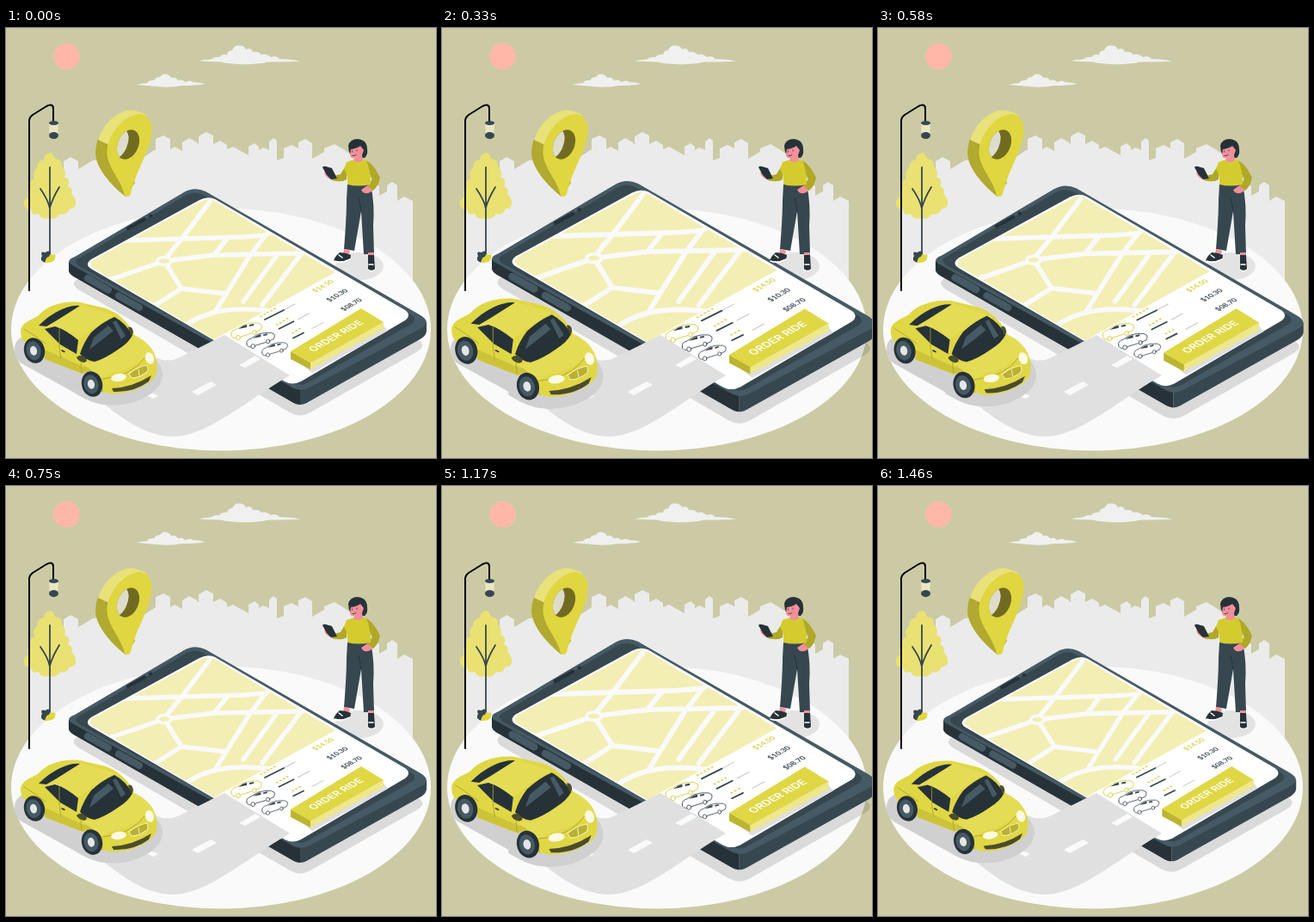
Recreate the animation shown at these times as an HTML page. Size 500 by 500 pixels, loop 1500 ms.

```html
<!DOCTYPE html>
<html lang="en">
<head>
<meta charset="utf-8">
<title>Order ride</title>
<style>
  html, body { margin: 0; width: 100%; height: 100%; overflow: hidden; background: #cccaa4; }
  svg { display: block; width: 100vw; height: 100vh; }
  text { font: 700 8px Lato, sans-serif; text-anchor: middle; }
  .line { fill: none; stroke-linecap: round; stroke-linejoin: round; }
</style>
</head>
<body>
<svg viewBox="0 0 500 500">
  <defs>
    <clipPath id="mapArea"><path d="M101 270 L226 202 Q235 197 242 201 L383 284 L242 362 L101 279 Q95 275 101 270Z"/></clipPath>
    <clipPath id="pinHole"><ellipse cx="142" cy="135.500" rx="12" ry="18" transform="rotate(23 142 135.500)"/></clipPath>
    <g id="van" class="line" stroke-width=".9">
      <path d="M-17 5 Q-18 0 -11 -2 L-3 -7 Q6 -10 14 -9 L18 -7 Q19 -4 17 -1 L12 1 M7 3 L-6 7 M-12 9 Q-17 9 -17 5"/>
      <path d="M-9 -2 L-3 -6 L1 -7 L1 -4Z M4 -5 L4 -7 L9 -8 L9 -6Z" fill="#37474f" stroke="none"/>
      <ellipse cx="-9" cy="8" rx="2.500" ry="2.700"/><ellipse cx="10" cy="2" rx="2.200" ry="2.500"/>
    </g>
  </defs>

  <!-- backdrop -->
  <circle cx="70.500" cy="33" r="15.300" fill="#ffb8a8"/>
  <g fill="#f0f0f0">
    <path d="M224 38.500 Q231 36.500 238 36.500 Q242 33 248 34 Q251 30 257 31 Q258 26 263 26 Q266 19 272 20.500 Q277 20 279 25 Q285 22 287 28 Q294 27 297 31 Q303 29 308 34 Q314 31 318 36 Q332 36 342 38.500 Q330 39.500 305 39.500 Q290 43 270 42 Q255 41 250 39.500Z"/>
    <path d="M152 66 Q158 64 164 64 Q167 60 172 61 Q174 57 179 57 Q182 52 187 54 Q191 55 192 58 Q197 56 200 61 Q206 59 208 63 Q214 60 218 63 Q226 63 231 65 Q222 67 205 67 Q190 70 176 68Z"/>
  </g>
  <path fill="#ebebeb" d="M27 310 V208 L40 200 67 205 V155 L75 150 84 155 V164 L101 154 160 150 174 141 V129 L183 125 191 129 V141 L196 138 205 143 V133 L213 128 222 133 224 136 V126 L233 121 241 125 V135 L249 131 257 136 V141 L264 138 282 148 V138 L289 134 294 138 V142 L299 139 306 142 V132 L311 128 315 131 V154 L323 151 V140 L332 136 340 140 V133 L348 129 356 134 V152 L370 144 V140 L382 135 392 141 406 150 428 180 434 184 V195 L443 190 V183 L449 179 455 183 V201 L463 196 473 201 V300Z"/>
  <ellipse cx="250" cy="350.500" rx="244" ry="141" fill="#fafafa"/>
  <ellipse cx="411" cy="277" rx="28" ry="16" fill="#e3e3e3"/>

  <!-- tree -->
  <path fill="#e9e172" d="M51 145 Q56 146 57 152 Q66 153 65 161 Q71 167 68 173 Q76 176 72 184 Q79 187 76 193 Q82 198 81 206 Q79 211 74 210 Q70 219 63 216 Q58 224 50 221 Q42 224 38 216 Q30 219 29 211 Q21 211 21 205 Q20 199 26 196 Q23 190 29 185 Q26 178 33 175 Q30 167 36 163 Q36 154 44 153 Q45 146 51 145Z"/>
  <path class="line" stroke="#37474f" stroke-width="1.800" d="M51 162 V270 M51 210 Q49 200 40 187 M51 209 Q54 198 62 185"/>
  <path fill="#37474f" d="M46 273 Q38 270 42 265 Q39 259 46 261 Q51 257 52 264 L50 271Z"/>
  <path fill="#e0d63f" d="M45 273 Q47 265 50 266 Q51 261 54 264 Q59 262 57 268 Q57 273 45 273Z"/>

  <!-- lamp -->
  <path class="line" stroke="#000" stroke-width="2" d="M27 305 V108 Q27 104 31 101 L47 91 Q55 87 55 94 V109"/>
  <path fill="#e9e7c2" d="M50 111 H61 L60 125 H51Z"/>
  <ellipse cx="55.500" cy="110.500" rx="5.500" ry="2.500" fill="#37474f"/>
  <ellipse cx="55.500" cy="125" rx="5.500" ry="4" fill="#37474f"/>

  <!-- map pin -->
  <path fill="#b1a930" d="M139 196 C128 188 104 165 104 145 Q104 137 107 129 L125 122 150 180Z"/>
  <path fill="#e9e17a" d="M107 130 C114 109 131 96 145 95.500 Q155 96 164 102 L140 125 120 136Z"/>
  <path fill="#e0d63f" d="M138 195 C134 176 117 162 117.500 143 C118 125 136 101 156 100 C165 101 169.500 109 169.500 118 C169 142 151 165 145 193 Q143 198 138 195Z"/>
  <g clip-path="url(#pinHole)">
    <path fill="#716b22" d="M120 110 H165 V160 H120Z"/>
    <ellipse cx="131" cy="135" rx="10" ry="18" transform="rotate(23 131 135)" fill="#dedccb"/>
  </g>

  <!-- phone -->
  <g id="phone">
    <path fill="#000" fill-opacity=".13" d="M84 291 Q74 297 84 304 L330 447 Q342 454 354 447 L477 377 Q491 369 478 362 L342 290Z"/>
    <path fill="#263238" d="M73 272 L73 283 Q74 287 82 291 L331 434 Q337 438 342 438 V405 L110 260Z"/>
    <path fill="#37474f" d="M342 438 Q347 438 353 434 L483 361 Q489 357 489 352 V342 L342 400Z"/>
    <path fill="#455a64" d="M80 266 L207 191 Q219 184 232 190 L482 334 Q495 342 483 349 L353 418 Q342 424 331 417 L79 277 Q67 271 80 266Z"/>
    <path fill="#37474f" d="M86 267 L210 194 Q219 189 229 194 L472 334 Q479 340 470 345 L350 413 Q342 417 332 412 L85 277 Q77 271 86 267Z"/>
    <path fill="#fff" d="M99 269 L225 200 Q235 195 243 199 L464 328 Q472 334 464 340 L343 411 Q333 416 324 411 L99 280 Q91 275 99 269Z"/>
    <g class="line" stroke="#263238" stroke-width="4"><path d="M142 233 L161 222.500 M168 218.500 h.5"/></g>
    <g class="line" stroke="#455a64" stroke-width="8"><path d="M95 291 L119 304.500 M131 311.500 L155 325"/></g>
    <g clip-path="url(#mapArea)">
      <path fill="#f3eeb3" d="M80 190 H390 V370 H80Z"/>
      <g class="line" stroke="#fafafa" stroke-width="5.500">
        <path d="M237 202 L206 243 184 270 M140 247 L275 243 302 241 310 235 M120 293 L184 271 242 264 345 262 M184 271 L204 303 256 309 M204 303 L166 327 M258 244 L242 264 M302 241 L284 264 256 309 243 330 M316 263 L276 318 M342 264 L298 322"/>
        <path d="M203 350 Q225 333 250 329 Q280 324 320 331"/>
        <ellipse cx="184" cy="271" rx="8" ry="4.500" fill="#f3eeb3" stroke-width="3.500"/>
      </g>
    </g>
    <g id="rides"></g>
    <path fill="#dedede" d="M337 386 L356 401 444 352 438 345Z"/>
    <path fill="#bdb432" d="M331 376 L354 389 V397 L331 385Z"/>
    <path fill="#eee78b" d="M354 389 L439 342 V350 L354 397Z"/>
    <path fill="#e0d744" d="M331 376 L413 326 439 342 354 389.500Z"/>
    <text transform="matrix(.87 -.5 .87 .5 387 360)" fill="#fff" style="font: 600 11.500px Inter, sans-serif">ORDER RIDE</text>
  </g>

  <!-- road -->
  <path fill="#e0e0e0" d="M95 422 C125 445 155 475 195 475 C235 474 275 436 330 404 L254 357 L202 383 Q192 388 182 386 L150 375Z"/>
  <path fill="#fafafa" d="M150 420 L156 418 177 428 171 431Z M216 423 L238 411 245 415 223 427Z M271 392 L290 381 296 385 278 395Z"/>
  <path id="carShadow" fill="#d0d0d0" d="M10 372 Q10 360 30 355 L150 368 Q182 385 182 404 Q180 425 145 436 Q115 443 92 431 L18 390 Q9 384 10 372Z"/>

  <!-- car -->
  <g id="car">
    <use href="#carShadow" clip-path="inset(0 0 0 40%)"/>
    <path fill="#e0d745" d="M17 352 C18 343 28 340 37 335 C47 323 66 317 86 319 L116 326 C131 331 143 343 149 357 C163 364 173 374 175 388 C176 396 176 404 169 410 C157 420 136 427 120 425 L108 421 C110 407 99 395 89 402 L45 385 C45 369 34 358 22 366 Q17 361 17 352Z"/>
    <path fill="#cdc339" d="M45 374 L88 393 Q106 396 112 412 L113 424 108 421 C110 407 99 395 89 402 L45 385Z"/>
    <path fill="#e5dc55" d="M88 389 L106 389 141 367 149 357 C163 364 171 372 173 382 L161 383 Q149 396 124 401 L112 408Z"/>
    <path fill="#e5dc55" d="M49 347 L87 322 125 334 98 352 85 362Z"/>
    <path fill="#263238" d="M38 346 Q50 334 63 328 Q76 322 86 323 L59 340 47 347Z"/>
    <path fill="#263238" d="M45 350 L57 347 Q70 351 84 363 L82 379 63 368Z"/>
    <path fill="#263238" d="M86 379 Q90 366 99 354 Q112 342 126 336 Q139 343 147 357 Q143 366 130 374 Q116 384 103 388 Q94 387 86 379Z"/>
    <path fill="#455a64" d="M102 360 L119 346 125 352 97 374Z M124 342 L128 340 139 358 134 362Z"/>
    <path class="line" stroke="#a89f2c" stroke-width=".8" d="M62 350 V371 L64 384 M87 389 L88 400 M112 408 Q146 405 161 384 M21 350 Q30 355 46 367"/>
    <path class="line" stroke="#263238" stroke-width="1.500" d="M65 375 l3 1.500"/>
    <path fill="#4b4c2d" d="M82 383 Q86 379 91 382 Q97 387 91 389 Q84 388 82 383Z M142 348 Q147 346 148 354 L146 359Z"/>
    <g fill="#fbf9e2">
      <ellipse cx="167" cy="384" rx="5" ry="7" transform="rotate(-18 167 384)"/>
      <ellipse cx="131" cy="406.500" rx="9" ry="4.500" transform="rotate(-8 131 406.500)"/>
    </g>
    <path fill="#b9b034" stroke="#f6f1ac" d="M143 402 Q153 394 164 392 Q166 397 164 400 Q155 407 146 407Z"/>
    <path class="line" stroke="#f6f1ac" d="M154 397 L155 404"/>
    <path fill="#4b4c2d" d="M123 419 Q147 418 169 404 L166 411 Q149 424 125 423Z"/>
    <g id="wheels"></g>
  </g>

  <!-- passenger -->
  <path fill="#37474f" d="M397 182 L424 182 Q429 205 427 230 L428 263 H416 L413 213 405 259 L393 257 Q396 220 396 200Z"/>
  <path class="line" stroke="#263238" d="M413 213 L410 197"/>
  <path fill="#f0909a" d="M393 257 L400 259 399 264 392 263Z M421 261 H428 V266 H421Z"/>
  <path fill="#263238" d="M388 261 Q395 261 401 264 L400 270 Q388 273 381 271 Q382 266 388 261Z M421 264 H428 L429 281 Q425 285 421 281Z"/>
  <path class="line" stroke="#fff" stroke-width="1.500" d="M382 271 Q390 274 400 269 M421 281 Q425 284 429 281 M387 264 l4 3 M422 275 h5"/>
  <path fill="#f0909a" d="M370 168 Q374 163 379 167 L385 173 382 178 Q371 174 370 168Z M413 188 L425 180 428 187 Q421 195 415 191Z"/>
  <path fill="#b0a827" d="M397 158 Q391 166 389 170 L381 172 379 177 Q391 180 396 176Z"/>
  <path fill="#b0a827" d="M418 154 Q426 156 435 174 Q433 184 427 189 L421 184 426 175 420 165Z"/>
  <path fill="#d4cb2f" d="M396 156 Q409 150 419 154 Q424 165 424 182 Q410 185 397 182 Q398 170 393 164Z"/>
  <path fill="#263238" d="M368 162 Q369 160 372 161 L379 163 385 175 378 176 373 171Z"/>
  <path fill="#263238" d="M398 137 Q400 129 409 129 Q420 130 420 141 Q421 147 417 151 Q408 151 401 149 Q398 143 398 137Z"/>
  <path fill="#f0909a" d="M401 141 Q408 140 412 137 L416 142 414 148 415 154 Q409 158 404 154 L405 151 Q400 152 400 147Z"/>
  <path class="line" stroke="#263238" d="M402.500 143 v1 M408 142 v1 M403 148.500 q2 1 4 -1" stroke-width=".8"/>
</svg>
<script>
const $ = id => document.getElementById(id);

const rides = [['$14.50', '#d9cf45'], ['$10.30', '#37474f'], ['$08.70', '#37474f']];
$('rides').innerHTML = rides.map(([price, color], i) => {
  const stars = '★'.repeat(5 - i);
  return `<g transform="translate(${16.5 * i} ${10.7 * i})">
    <use href="#van" transform="translate(279 352) scale(${1 - i * .08})" stroke="${color}"/>
    <text transform="matrix(.87 -.5 .87 .5 306 331.500)" fill="#d9cf45" style="font: 5px DejaVu Sans, sans-serif">${stars}</text>
    <path class="line" stroke="#c4c9cc" d="M323 328 L336 321"/>
    <path class="line" stroke="#37474f" stroke-width="1.700" d="M301 339 L${323 - 5 * i} ${328 + 2.5 * i}"/>
    <text transform="matrix(.87 -.5 .87 .5 371 301.500)" fill="${color}">${price}</text>
  </g>`;
}).join('');

$('wheels').innerHTML = [[33, 375], [100, 414]].map(([x, y]) =>
  `<g transform="translate(${x} ${y}) rotate(-14)">
    <ellipse rx="12" ry="15" fill="#263238"/>
    <ellipse cx="-1" rx="8.500" ry="11" fill="#455a64"/>
    <ellipse cx="-1" rx="4" ry="5.500" fill="#e6e6e6"/>
  </g>`).join('');

const LOOP = 1500;
// [time in ms, scale], eased with a half cosine between neighbours
const pulse = [[0, 1], [340, 1.07], [770, 1], [1180, 1.07], [LOOP, .983]];

function scaleAt(t) {
  const i = pulse.findIndex(key => t < key[0]);
  const [t0, s0] = pulse[i - 1], [t1, s1] = pulse[i];
  return s0 + (s1 - s0) * (1 - Math.cos(Math.PI * (t - t0) / (t1 - t0))) / 2;
}

function zoom(id, x, y, s) {
  $(id).setAttribute('transform', `translate(${x} ${y}) scale(${s}) translate(${-x} ${-y})`);
}

function draw(now) {
  const s = scaleAt(now % LOOP);
  zoom('phone', 288, 319, s);
  zoom('car', 101, 377, s);
  requestAnimationFrame(draw);
}
draw(performance.now());
</script>
</body>
</html>
```
